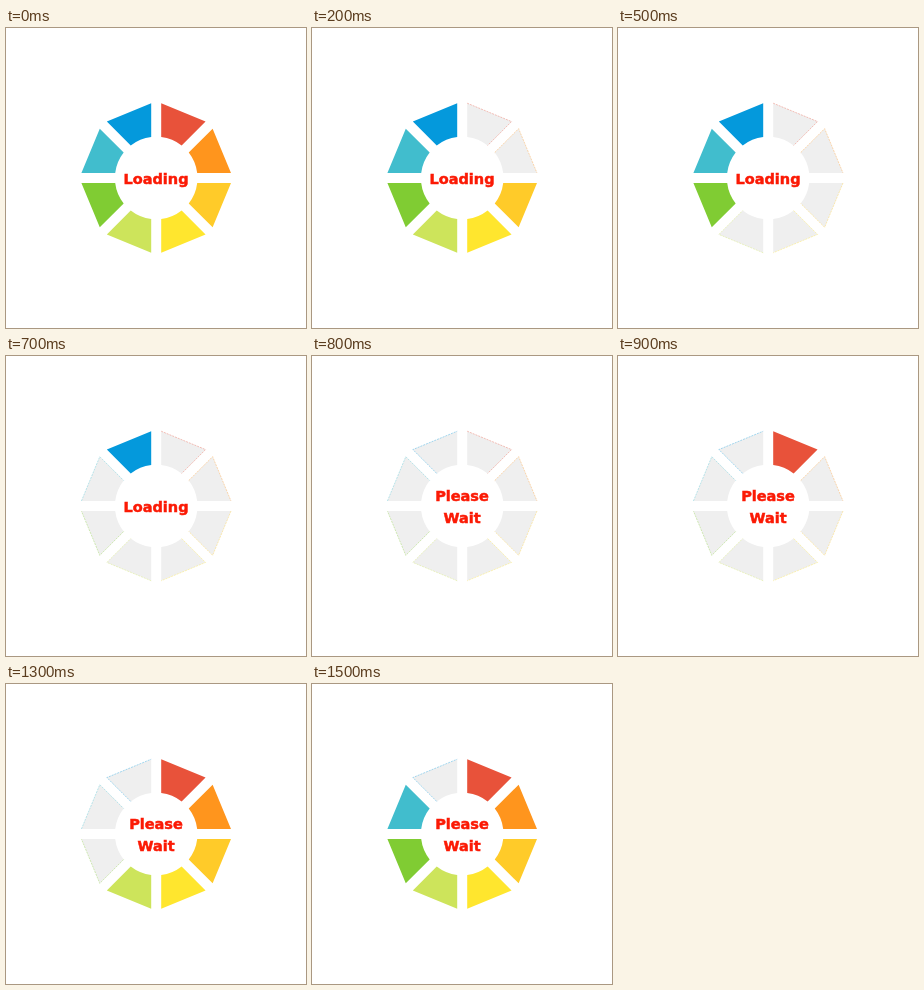
Recreate the animation shown at these times as an HTML page. Size 300x300 px, loop 1600 ms.

```html
<!DOCTYPE html>
<html lang="en">
<head>
<meta charset="utf-8">
<title>Loading</title>
<style>
  html, body { margin: 0; width: 100%; height: 100%; overflow: hidden; background: #fff; }
  svg { display: block; width: 100vw; height: 100vh; }
  text {
    font: bold 14.5px "DejaVu Sans", sans-serif;
    text-anchor: middle;
    fill: #fb1a05;
    stroke: #fb1a05;
    stroke-width: .5;
  }
  .edge { fill: none; stroke-width: .7; stroke-dasharray: 2 1; opacity: .5; }
</style>
</head>
<body>
<svg viewBox="0 0 300 300">
  <g id="wheel" transform="translate(150.2 150)"></g>
  <text id="loading" x="150" y="156">Loading</text>
  <g id="wait">
    <text x="150" y="145">Please</text>
    <text x="150" y="167">Wait</text>
  </g>
</svg>
<script>
const COLORS = ['#e8523a', '#ff951d', '#ffcb29', '#ffe62e', '#cde45b', '#80cc33', '#41bdcd', '#0499dc'];
const EMPTY = '#efefef';
const STEP = 100, COUNT = COLORS.length;
const OUTER = 74.8, INNER = 41, GAP = 5;
const $ = id => document.getElementById(id);

function add(parent, name, attrs) {
  const el = document.createElementNS('http://www.w3.org/2000/svg', name);
  for (const key in attrs) el.setAttribute(key, attrs[key]);
  return parent.appendChild(el);
}

// A point at distance r along a spoke, moved sideways by half the gap.
function spoke(index, r, side) {
  const a = index * Math.PI / 4, s = Math.sin(a), c = Math.cos(a);
  return [r * s + side * c, -r * c + side * s].map(v => v.toFixed(2)).join(' ');
}

const segments = COLORS.map((color, i) => {
  const a = spoke(i, INNER, GAP), b = spoke(i, OUTER, GAP);
  const c = spoke(i + 1, OUTER, -GAP), d = spoke(i + 1, INNER, -GAP);
  const shape = add($('wheel'), 'path', { d: `M${a}L${b}L${c}L${d}A${INNER} ${INNER} 0 0 0 ${a}Z` });
  // Emptied segments keep a faint coloured rim on the outer and diagonal sides.
  const rim = i % 2 ? `M${a}L${b}L${c}` : `M${b}L${c}L${d}`;
  const edge = add($('wheel'), 'path', { d: rim, class: 'edge', stroke: color });
  return { color, shape, edge };
});

function draw(time) {
  const step = Math.floor(time / STEP) % (2 * COUNT);
  const filling = step >= COUNT;
  segments.forEach(({ color, shape, edge }, i) => {
    const on = filling ? i < step - COUNT : i >= step;
    shape.setAttribute('fill', on ? color : EMPTY);
    edge.setAttribute('visibility', on ? 'hidden' : 'visible');
  });
  $('loading').setAttribute('visibility', filling ? 'hidden' : 'visible');
  $('wait').setAttribute('visibility', filling ? 'visible' : 'hidden');
}

const start = performance.now();
function tick() {
  draw(performance.now() - start);
  requestAnimationFrame(tick);
}
tick();
</script>
</body>
</html>
```
